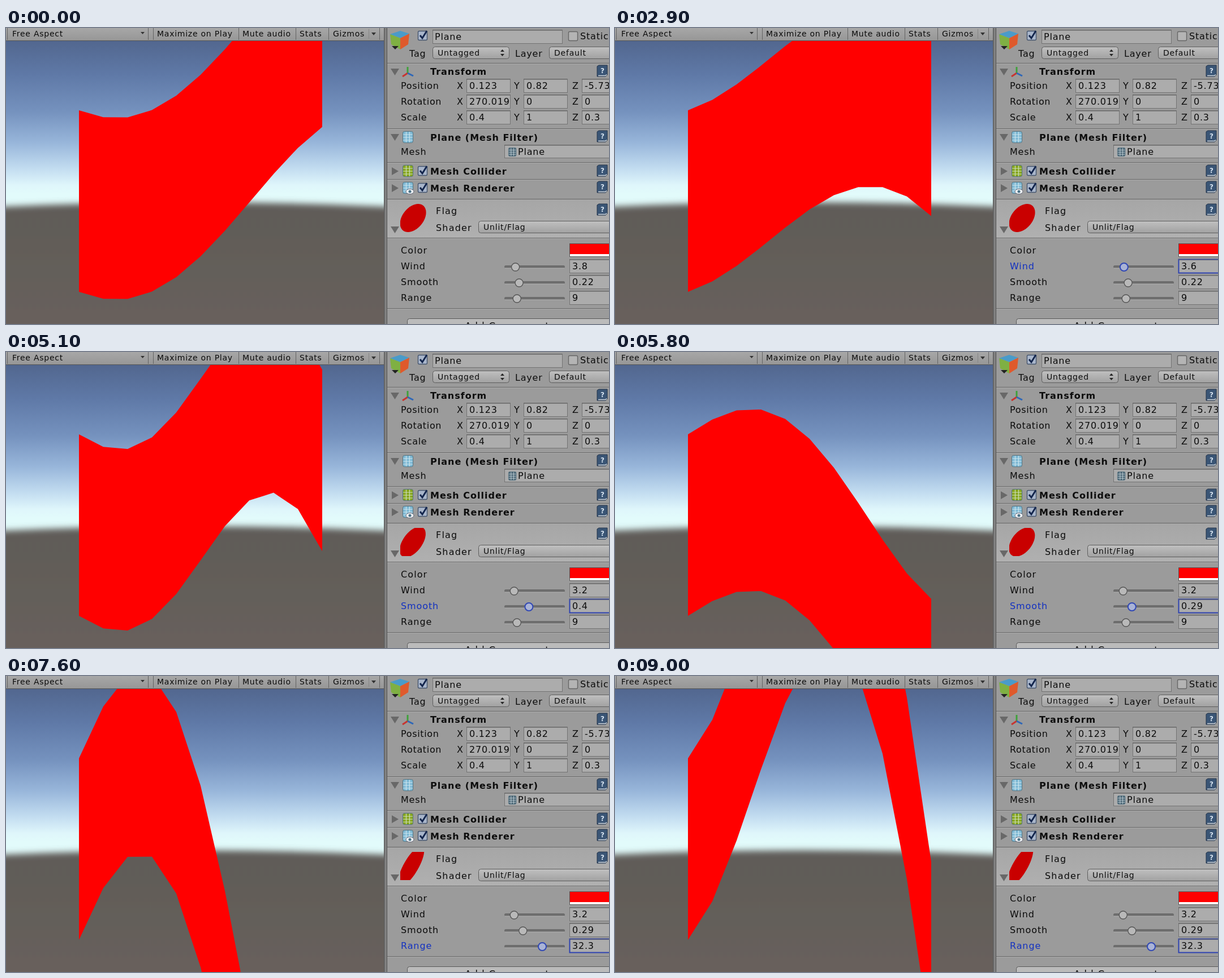
These frames come from a looping animation (1066x525 px, 9.5 s). An HTML page:

```html
<!DOCTYPE html>
<html lang="en">
<head>
<meta charset="utf-8">
<title>Flag shader inspector</title>
<style>
html, body { margin: 0; width: 100%; height: 100%; overflow: hidden; background: #9b9b9b; }
svg { display: block; width: 1066px; height: 525px; }
text { font-family: "DejaVu Sans", Verdana, sans-serif; fill: #0c0c0c; white-space: pre; }
</style>
</head>
<body>
<svg id="stage" viewBox="0 0 1066 525"></svg>
<script>
const stage = document.getElementById('stage');
const $ = id => document.getElementById(id);

// ---- drawing helpers, all return SVG markup ----
const text = (s, x, y, size = 16, gap = .8, extra = '') =>
  `<text x="${x}" y="${y}" font-size="${size}" letter-spacing="${gap}" ${extra}>${s}</text>`;
const title = (s, y) => text(s, 750, y, 16, 1, 'font-weight="bold"');
const rect = (x, y, w, h, fill, extra = '') =>
  `<rect x="${x}" y="${y}" width="${w}" height="${h}" fill="${fill}" ${extra}/>`;
const path = (d, fill, extra = '') => `<path d="${d}" fill="${fill}" ${extra}/>`;
const line = (d, stroke, width = 1) => path(d, 'none', `stroke="${stroke}" stroke-width="${width}"`);
const gradient = (id, ...stops) => `<linearGradient id="${id}" x2="0" y2="1">${
  stops.map(([at, c]) => `<stop offset="${at}" stop-color="${c}"/>`).join('')}</linearGradient>`;

const field = (x, y, w, h = 24, extra = '') =>
  rect(x + .5, y + .5, w, h, '#acacac', `stroke="#737373" ${extra}`) +
  line(`M${x} ${y + 1}H${x + w}`, '#5f5f5f');
const popup = (s, x, y, w) =>
  rect(x + .5, y + .5, w, 21, 'url(#button)', 'rx="4" stroke="#5d5d5d"') + text(s, x + 9, y + 16, 14);
const check = (x, y, on = true) =>
  rect(x + .5, y + .5, 16, 16, on ? '#a9b6cb' : '#b4b4b4', `rx="2" stroke="${on ? '#45556e' : '#666'}" stroke-width="1.4"`) +
  (on ? line(`M${x + 4} ${y + 8}l4 5l8 -13`, '#14264d', 3) : '');
const fold = (y, open) => path(open ? `M680 ${y - 5}h15l-7.5 12z` : `M682 ${y - 7}v14l12 -7z`, '#686868');
const book = y =>
  path(`M1045 ${y + 2}l3 -2h15v17l-3 3h-15z`, '#3a5575', 'stroke="#24344a"') +
  line(`M1047 ${y + 18.5}h13l2 -2`, '#d3d9df', 1.5) +
  text('?', 1051, y + 14, 12, 0, 'font-weight="bold" style="fill:#d5e2ef"');
const mesh = (x, y, fill, s = 1) =>
  `<g transform="translate(${x} ${y}) scale(${s})">` +
  rect(.5, .5, 18, 20, fill, 'rx="3" stroke="#51717f"') +
  line('M6.5 1V20M12.5 1V20M1 6H18M1 11H18M1 16H18', 'rgba(235,248,250,.7)', 1.2) + '</g>';
const divider = y => line(`M674 ${y + .5}H1066`, '#666') + line(`M674 ${y + 1.5}H1066`, '#adadad');

function scene() {
  return rect(0, 23, 668, 502, 'url(#sky)') +
    `<g clip-path="url(#view)"><path d="M-30 318Q334 300 698 318V560H-30z" fill="url(#ground)" filter="url(#haze)"/>` +
    path('', '#f00', 'id="flag"') + '</g>';
}

function toolbar() {
  const labels = [['Free Aspect', 11], ['Maximize on Play', 267], ['Mute audio', 418], ['Stats', 519], ['Gizmos', 578]];
  return rect(0, 0, 668, 23, 'url(#bar)') + line('M0 22.5H668', '#555') +
    [2, 251, 260, 411, 512, 570, 660].map(x => line(`M${x}.5 0V21`, '#636363')).join('') +
    line('M641.5 2V19', '#858585') +
    path('M238 7h7l-3.5 4zM646 8h8l-4 5z', '#333') +
    labels.map(([s, x]) => text(s, x, 15, 14, .75)).join('');
}

function objectHeader() {
  return path('M679 11l18 -6l16 5l-16 8z', '#4a9bc9') + path('M679 11l18 7v20l-16 -9z', '#7fb043') +
    path('M697 18l16 -8l-2 19l-14 9z', '#df5a2c') +
    path('M682 32h12l-6 6z', '#222') +
    check(728, 5) + field(754, 3, 229) + text('Plane', 758, 21) +
    check(994, 6, false) + text('Static', 1015, 20) +
    text('Tag', 713, 51) + popup('Untagged', 754, 33, 135) + path('M874 42h7l-3.5 -4zM874 46h7l-3.5 4z', '#222') +
    text('Layer', 900, 51) + popup('Default', 960, 33, 120);
}

function transform() {
  const rows = [['Position', '0.123', '0.82', '-5.73'], ['Rotation', '270.019', '0', '0'], ['Scale', '0.4', '1', '0.3']];
  return fold(77, true) + line('M710 80V69', '#3fa13a', 3) + line('M710 80L701 86', '#c8342f', 3) +
    line('M710 80L720 85', '#2e67b8', 3) + title('Transform', 83) + book(66) +
    rows.map(([name, ...values], r) => {
      const y = 108 + 28 * r;
      return text(name, 698, y, 16, .65) + values.map((v, i) => {
        const x = [814, 915, 1018][i];
        return text('XYZ'[i], x - 17, y) + field(x, y - 18, 77) +
          `<svg x="${x}" y="${y - 18}" style="width:74px;height:25px">${text(v, 5, 18)}</svg>`;
      }).join('');
    }).join('');
}

function components() {
  return fold(193, true) + mesh(701, 183, '#7fb9d4') + title('Plane (Mesh Filter)', 200) + book(182) +
    text('Mesh', 698, 225) + field(881, 207, 200, 23) + mesh(888, 212, '#4d6776', .75) + text('Plane', 905, 225) +
    fold(254) + mesh(701, 243, '#86a51f') + check(728, 245) + title('Mesh Collider', 260) + book(243) +
    fold(284) + mesh(701, 273, '#7fb9d4') +
    '<ellipse cx="714" cy="290" rx="7" ry="4.5" fill="#eef3f5" stroke="#667"/><circle cx="714" cy="290" r="2.5" fill="#4a7187"/>' +
    check(728, 275) + title('Mesh Renderer', 290) + book(272);
}

function material() {
  const slider = (id, name, y) =>
    text(name, 698, y, 16, .9, `id="${id}Label"`) +
    rect(881, y - 7, 107, 5, '#6d6d6d', 'rx="2.5"') + line(`M882 ${y - 2}H987`, '#b5b5b5') +
    `<circle id="${id}Knob" cy="${y - 4}" r="7"/>` +
    field(996, y - 18, 90, 24, `id="${id}Box"`) + text('', 1001, y, 16, .8, `id="${id}Value"`);
  return rect(674, 304, 392, 68, 'url(#head)') + fold(357, true) +
    `<g clip-path="url(#thumb)">${path('', '#c90000', 'id="ball"')}</g>` +
    text('Flag', 760, 330, 16, 1.2) + book(312) +
    text('Shader', 760, 360, 16, 1.2) + popup('Unlit/Flag', 835, 342, 250) +
    text('Color', 698, 400, 16, 1.1) + rect(996.5, 382.5, 90, 23, '#fff', 'stroke="#555"') + rect(997, 383, 80, 18, '#f00') +
    slider('wind', 'Wind', 428) + slider('smooth', 'Smooth', 456) + slider('range', 'Range', 484) +
    rect(709.5, 515.5, 390, 30, '#bbb', 'rx="4" stroke="#595959"') + text('Add Component', 811, 535, 17, 1);
}

stage.innerHTML = '<defs>' +
  gradient('sky', [0, '#52678f'], [.12, '#5f79a7'], [.25, '#7592be'], [.36, '#98b6da'], [.45, '#c2dcf0'],
    [.51, '#dff6fb'], [.54, '#e2fbfb']) +
  gradient('ground', [0, '#5f5c59'], [.3, '#625d59'], [1, '#69615c']) +
  gradient('bar', [0, '#a7a7a7'], [1, '#969696']) +
  gradient('button', [0, '#c0c0c0'], [1, '#a1a1a1']) +
  gradient('head', [0, '#a6a6a6'], [1, '#b0b0b0']) +
  '<filter id="haze"><feGaussianBlur stdDeviation="6"/></filter>' +
  '<clipPath id="view"><rect y="23" width="668" height="502"/></clipPath>' +
  '<clipPath id="thumb"><rect x="697" y="312" width="46" height="50"/></clipPath></defs>' +
  scene() + toolbar() +
  rect(668, 0, 6, 525, '#828282') + rect(668, 0, 1.5, 525, '#5c5c5c') + rect(673, 0, 1.5, 525, '#505050') +
  rect(674, 0, 392, 525, '#9b9b9b') +
  [62, 178, 238, 268, 303, 372, 497].map(divider).join('') +
  objectHeader() + transform() + components() + material();

// ---- motion ----
// Piecewise linear value through [time, value] points.
function track(t, points) {
  let [t0, v0] = points[0];
  for (const [t1, v1] of points) {
    if (t < t1) return t <= t0 ? v0 : v0 + (v1 - v0) * (t - t0) / (t1 - t0);
    [t0, v0] = [t1, v1];
  }
  return v0;
}
const round = (v, n) => +v.toFixed(n);

function setSlider(id, value, max, focused) {
  const knob = $(id + 'Knob');
  knob.setAttribute('cx', 886 + 96 * value / max);
  knob.setAttribute('fill', focused ? '#a9b3d6' : '#b9b9b9');
  knob.setAttribute('stroke', focused ? '#3148b4' : '#555');
  knob.setAttribute('stroke-width', focused ? 2 : 1.3);
  $(id + 'Label').style.fill = focused ? '#1432c0' : '';
  $(id + 'Box').setAttribute('stroke', focused ? '#2f43b0' : '#737373');
  $(id + 'Box').setAttribute('stroke-width', focused ? 2 : 1);
  $(id + 'Value').textContent = value;
}

function draw(ms) {
  const step = Math.floor(ms / 100 + 1e-6) / 10;
  const t = step < .9 ? .853 : Math.min(step, 9);
  const wind = round(track(t, [[2.6, 3.8], [3.5, 3.2]]), 1);
  const smooth = round(track(t, [[4.2, .22], [5.1, .4], [5.6, .29]]), 2);
  const range = round(track(t, [[6.1, 9], [6.6, 21], [7.2, 32.3]]), 1);
  const focus = t < 2.4 ? '' : t < 3.9 ? 'wind' : t < 6 ? 'smooth' : 'range';
  setSlider('wind', wind, 25, focus === 'wind');
  setSlider('smooth', smooth, 1, focus === 'smooth');
  setSlider('range', range, 50, focus === 'range');

  // Eleven mesh columns, pinned at the left; the wave grows to the right.
  const clock = 4.573 + 1.0974 * (t - 1.9);
  const top = [], bottom = [];
  for (let k = 0; k <= 10; k++) {
    const x = 129 + 43 * k;
    const y = 146 - 3.25 * range * k * Math.sin(wind * clock + smooth * (k - 5));
    top.push(`${x} ${y}`);
    bottom.unshift(`${x} ${y + 322}`);
  }
  $('flag').setAttribute('d', `M${top.concat(bottom).join('L')}z`);

  // Material preview: a sheared disc.
  const bend = smooth * range, shear = .27 * bend ** .66, disc = [];
  for (let i = 0; i < 48; i++) {
    const a = i * Math.PI / 24, x = 23 * Math.cos(a);
    disc.push(`${720.5 - .45 * bend + x} ${337 + 23 * Math.sin(a) - shear * x}`);
  }
  $('ball').setAttribute('d', `M${disc.join('L')}z`);
}

const start = performance.now();
function frame() {
  draw((performance.now() - start) % 9500);
  requestAnimationFrame(frame);
}
frame();
</script>
</body>
</html>
```
